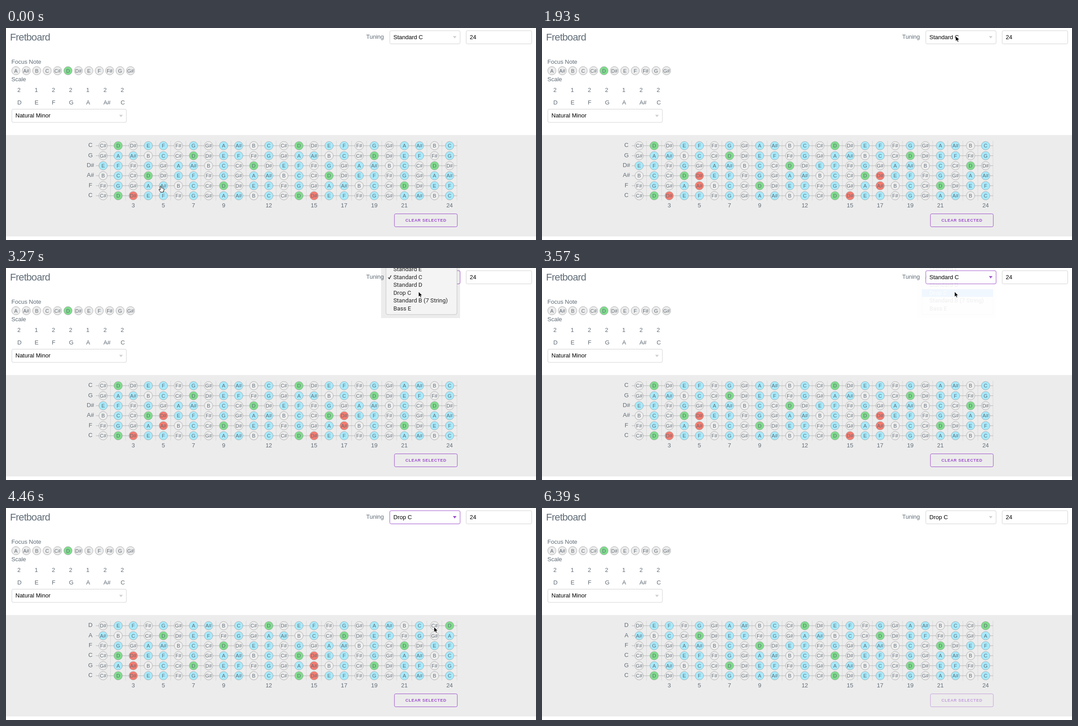
An HTML page that plays this animation: 1180x474 px, repeating every 6.69 s.

```html
<!DOCTYPE html>
<html lang="en">
<head>
<meta charset="utf-8">
<title>Fretboard</title>
<style>
  html, body { margin: 0; width: 100%; height: 100%; overflow: hidden; background: #fff; }
  svg { display: block; font: 13px "Liberation Sans", Arial, sans-serif; fill: #606c76; }
  .title { font-size: 22px; letter-spacing: -.7px; }
  .note { font-size: 11.3px; text-anchor: middle; }
  .mid { text-anchor: middle; }
  .value { fill: #000; }
  .field { fill: #fff; stroke: #d1d1d1; }
  .menu { font: 13.1px Roboto, sans-serif; }
  .button { font-size: 9px; font-weight: bold; letter-spacing: .7px; }
</style>
</head>
<body>
<script>
const LOOP = 6690;
const NOTES = ['A', 'A#', 'B', 'C', 'C#', 'D', 'D#', 'E', 'F', 'F#', 'G', 'G#'];
const SCALE = ['D', 'E', 'F', 'G', 'A', 'A#', 'C'];
const INTERVALS = [2, 1, 2, 2, 1, 2, 2];
const ROOT = 'D';
const TUNINGS = {
  'Standard C': ['C', 'G', 'D#', 'A#', 'F', 'C'],
  'Drop C': ['D', 'A', 'F', 'C', 'G', 'C']
};
const MENU = ['Standard E', 'Standard C', 'Standard D', 'Drop C', 'Standard B (7 String)', 'Bass E'];
const MARKERS = [3, 5, 7, 9, 12, 15, 17, 19, 21, 24];
const PICKS = [[5, 'D#'], [4, 'A#'], [3, 'D#']];
const PURPLE = '#9b4dca', GREY = '#606c76', LINE = '#d1d1d1';
const GREEN = '#7fdc8c', BLUE = '#a6eafd', RED = '#f67c70', PANEL = '#ececec';

// Each step changes part of the state and holds until the next one.
const steps = [
  [0, { x: 344.5, y: 353, cursor: 'hand', tuning: 'Standard C', picked: 1, focus: false, menu: 0, item: 1, button: 'on' }],
  [150, { x: 349.5, y: 353.5 }],
  [740, { picked: 2 }],
  [890, { x: 349, y: 331, picked: 3 }],
  [1190, { x: 415, y: 309, cursor: 'arrow' }],
  [1340, { x: 560, y: 205 }],
  [1490, { x: 715, y: 112 }],
  [1640, { x: 830, y: 55 }],
  [1790, { x: 897, y: 28 }],
  [1930, { x: 921, y: 18 }],
  [2080, { focus: true, menu: 1 }],
  [2380, { x: 922, y: 21 }],
  [2530, { x: 921.5, y: 26 }],
  [2680, { x: 920, y: 41, item: 2 }],
  [2820, { x: 918.5, y: 53, item: 3 }],
  [3270, { item: -1 }],
  [3420, { item: 3 }],
  [3570, { menu: .07 }],
  [3710, { menu: 0, tuning: 'Drop C' }],
  [4160, { x: 921, y: 80 }],
  [4310, { x: 935, y: 165 }],
  [4460, { x: 953, y: 266 }],
  [4610, { x: 980, y: 340 }],
  [4760, { x: 1008, y: 392 }],
  [4910, { x: 1035, y: 428 }],
  [5050, { x: 1056, y: 446 }],
  [5200, { x: 1066, y: 453 }],
  [5350, { x: 994, y: 440.5 }],
  [5500, { x: 965, y: 433, cursor: 'hand', button: 'hover' }],
  [5650, { x: 955, y: 431, focus: false }],
  [5800, { cursor: 'arrow', button: 'off', picked: 0 }],
  [5940, { x: 951, y: 436 }],
  [6090, { x: 945, y: 448 }],
  [6240, { x: 938, y: 463 }],
  [6390, { cursor: '' }]
];
let merged = {};
const states = steps.map(([time, change]) => ({ time, ...(merged = { ...merged, ...change }) }));

function add(parent, tag, attrs = {}, content = '') {
  const el = document.createElementNS('http://www.w3.org/2000/svg', tag);
  set(el, attrs);
  el.textContent = content;
  return parent.appendChild(el);
}
function set(el, attrs) {
  for (const name in attrs) el.setAttribute(name, attrs[name]);
}
const text = (parent, x, y, content, cls = '') => add(parent, 'text', { x, y, class: cls }, content);
const box = (x, y, width, height, more) => ({ x, y, width, height, ...more });
const field = (x, y, width) => add(svg, 'rect', box(x, y, width, 29.5, { rx: 3, class: 'field' }));
const arrowDown = (x, y) => add(svg, 'path', { d: `M${x} ${y}h8l-4 5.5z`, fill: LINE });

function noteDot(x, y, r) {
  const dot = add(svg, 'circle', { cx: x, cy: y, r, fill: PANEL, stroke: '#9c9c9c', 'stroke-width': .8 });
  return { dot, label: text(svg, x, y + 4, '', 'note') };
}
function paint({ dot, label }, note, color) {
  if (label.textContent !== note) label.textContent = note;
  dot.setAttribute('fill', color);
}

const svg = add(document.body, 'svg', { width: 1180, height: 474 });

// Header and scale picker
text(svg, 9, 27.5, 'Fretboard', 'title');
text(svg, 802, 24, 'Tuning');
const tuningField = field(854.5, 6, 156.5);
const tuningText = text(svg, 862.5, 25, '', 'value');
const tuningArrow = arrowDown(995, 18);
field(1024.5, 6, 146);
text(svg, 1032.5, 25, '24', 'value');
text(svg, 12, 80, 'Focus Note');
NOTES.forEach((note, i) => paint(noteDot(22 + 23.2 * i, 95.5, 9.3), note, note === ROOT ? GREEN : PANEL));
text(svg, 12, 119, 'Scale');
SCALE.forEach((note, i) => {
  const x = 25.3 + 38.33 * i;
  text(svg, x, 143, INTERVALS[i]);
  text(svg, x, 171, note);
});
field(13, 181.5, 255);
text(svg, 21, 200, 'Natural Minor', 'value');
arrowDown(252, 194);

// Fretboard
add(svg, 'rect', box(0, 239.3, 1180, 226.7, { fill: PANEL }));
const fretX = fret => 216.2 + 33.54 * (fret - 1);
const stringY = row => 263.2 + 22.36 * row;
for (let fret = 1; fret <= 24; fret++) {
  add(svg, 'path', { d: `M${fretX(fret) + 16.4} 252V386`, stroke: '#d6d6d6' });
}
const rows = [0, 1, 2, 3, 4, 5].map(row => {
  const y = stringY(row);
  add(svg, 'path', { d: `M200 ${y}H1004`, stroke: '#b4b4b4' });
  return {
    label: text(svg, 188, y + 3, '', 'mid'),
    dots: Array.from({ length: 24 }, (_, i) => noteDot(fretX(i + 1), y, 9.4))
  };
});
MARKERS.forEach(fret => text(svg, fretX(fret), 401, fret, 'mid'));

const button = add(svg, 'g');
const buttonBox = add(button, 'rect', box(864.8, 415.5, 140, 29, { rx: 3, fill: 'none' }));
const buttonText = text(button, 889.3, 433.3, 'CLEAR SELECTED', 'button');

// Tuning menu
const menu = add(svg, 'g', { class: 'menu' });
add(menu, 'rect', box(835, -5, 176, 117, { fill: '#000', opacity: .075 }));
add(menu, 'rect', box(846, -10, 158, 114, { rx: 4, fill: '#f4f4f4', stroke: '#c4c4c4' }));
const highlight = add(menu, 'rect', box(846, 0, 158, 17.5, { fill: '#419af9' }));
const items = MENU.map((name, i) => text(menu, 862.5, 7.2 + 17.5 * i, name));
const check = add(menu, 'path', { d: 'M851 21l2.4 3.2L857.5 16.5', fill: 'none', 'stroke-width': 1.5 });

const cursors = {
  arrow: add(svg, 'path', {
    d: 'M0 0V11.6L2.7 9.1 4.5 13.2 6.5 12.4 4.8 8.4H8.3Z',
    fill: '#000', stroke: '#fff', 'stroke-width': .8
  }),
  hand: add(svg, 'path', {
    d: 'M-1.2 1Q0-.4 1.2 1L1.8 5Q2.8 4 3.8 5.2Q4.9 4.4 5.8 5.8Q7.4 5.4 7.3 7.5Q7.4 10 6 12V14H-.2Q-2.4 11.4-4 8.6Q-4 7-2.5 7.6L-1.2 9Z',
    fill: '#fff', stroke: '#000', 'stroke-linejoin': 'round'
  })
};

function drawBoard({ tuning, picked }) {
  const active = PICKS.slice(0, picked);
  rows.forEach(({ label, dots }, row) => {
    const open = TUNINGS[tuning][row];
    label.textContent = open;
    dots.forEach((dot, i) => {
      const note = NOTES[(NOTES.indexOf(open) + i + 1) % 12];
      const isPicked = active.some(([r, n]) => r === row && n === note);
      paint(dot, note, isPicked ? RED : note === ROOT ? GREEN : SCALE.includes(note) ? BLUE : '#eee');
    });
  });
}

function draw(state) {
  drawBoard(state);
  tuningText.textContent = state.tuning;
  tuningField.style.stroke = state.focus ? PURPLE : LINE;
  tuningArrow.setAttribute('fill', state.focus ? PURPLE : LINE);

  const color = state.button === 'hover' ? GREY : PURPLE;
  set(button, { opacity: state.button === 'off' ? .5 : 1 });
  set(buttonBox, { stroke: color });
  set(buttonText, { fill: color });

  set(menu, { opacity: state.menu });
  set(highlight, { y: 12.2 + 17.5 * (state.item - 1), opacity: state.item < 0 ? 0 : 1 });
  items.forEach((item, i) => set(item, { fill: i === state.item ? '#fff' : '#222' }));
  set(check, { stroke: state.item === 1 ? '#fff' : '#222' });

  for (const kind in cursors) {
    set(cursors[kind], {
      transform: `translate(${state.x} ${state.y})`,
      visibility: kind === state.cursor ? 'visible' : 'hidden'
    });
  }
}

let shown;
function tick() {
  const time = performance.now() % LOOP;
  const state = states.filter(s => s.time <= time).pop();
  if (state !== shown) draw(shown = state);
  requestAnimationFrame(tick);
}
tick();
</script>
</body>
</html>
```
